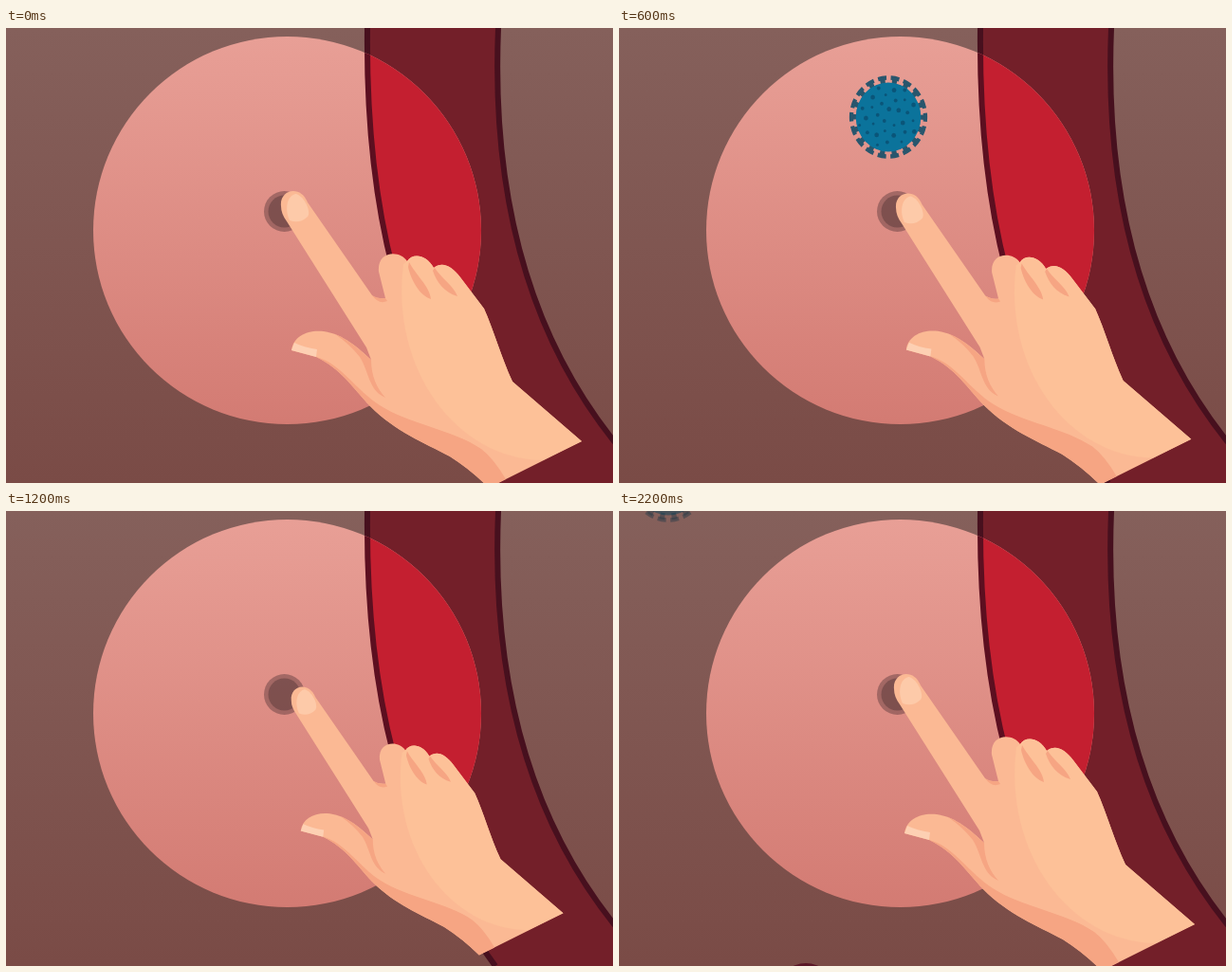
An HTML page with a canvas for the animation above (2300 ms loop, 640 px wide and 480 px high).

```html
<!DOCTYPE html>
<html lang="en">
<head>
<meta charset="utf-8">
<style>
html, body { margin: 0; width: 100%; height: 100%; overflow: hidden; background: #7f554f; }
canvas { display: block; width: 640px; height: 480px; }
</style>
</head>
<body>
<canvas id="stage" width="640" height="480"></canvas>
<script>
const ctx = document.getElementById('stage').getContext('2d');
const LOOP = 2300, STEP = 100, TAU = Math.PI * 2;

const dim = { top: '#85605b', bottom: '#7a4b46', vessel: '#731f29', edge: '#47101e',
  body: '#0b4259', spot: '#093448', spike: '#2d3c48' };
const lit = { top: '#e89f96', bottom: '#d37b73', vessel: '#c41f30', edge: '#5c0f20',
  body: '#0b739b', spot: '#0a5579', spike: '#29566d' };

const leftWall = 'M381 0C379 180 410 340 516 480';
const vessel = new Path2D(leftWall + 'L642 480V437C548 320 512 170 519 0Z');
const walls = new Path2D(leftWall + 'M519 0C512 170 548 320 642 437');

// Hand parts, painted in order
const outline = new Path2D('M290 188C288 170 311 165 318 184L386 282Q392 286 400 285L393 257C391 235 415 234 423 246C429 237 443 239 451 253C460 246 470 251 479 263L504 296C514 318 522 347 534 373L607 436L509 485Q490 466 468 452C440 437 411 426 384 399C366 380 354 360 327 347L301 340C303 325 318 318 335 320C356 323 372 338 385 350L380 337L296 204Q290 196 290 188Z');
const hand = [
  ['#fbb994', outline],
  ['#fdc198', 'M423 246C429 237 443 239 451 253C460 246 470 251 479 263L504 296C514 318 522 347 534 373L607 436L566 456C475 455 405 360 419 249Z'],
  ['#f6a583', 'M327 347C352 353 369 382 394 398C425 418 472 424 501 444Q514 454 527 476L509 485Q490 466 468 452C440 437 411 426 384 399C366 380 354 360 327 347Z'],
  ['#f6a583', 'M347 323C364 330 374 341 385 350C385 367 391 380 400 390C382 382 383 363 373 347Q362 333 347 323Z'],
  ['#f6a583', 'M425 247C431 259 447 273 448 286C436 282 427 266 424 252Z'],
  ['#f6a583', 'M452 253C459 264 472 272 476 283C462 279 454 268 450 256Z'],
  ['#f6a583', 'M386 282Q392 286 400 285L402 288Q393 292 386 282Z'],
  ['#fdcaa9', 'M299 203C293 190 297 176 306 175C315 178 322 194 318 199Q310 207 299 203Z'],
  ['#fdd0b3', 'M301 340L327 347L328 339Q314 337 304 332Z']
].map(([color, path]) => [color, new Path2D(path)]);

function disc(x, y, r, color) {
  ctx.beginPath();
  ctx.arc(x, y, r, 0, TAU);
  ctx.fillStyle = color;
  ctx.fill();
}

function dashRing(r, width, dash, color) {
  const slot = TAU * r / 18;
  ctx.setLineDash([slot * dash, slot * (1 - dash)]);
  ctx.lineDashOffset = slot * dash / 2;
  ctx.lineWidth = width;
  ctx.strokeStyle = color;
  ctx.beginPath();
  ctx.arc(0, 0, r, 0, TAU);
  ctx.stroke();
}

function virus(x, y, pal, alpha = 1) {
  ctx.save();
  ctx.globalAlpha = alpha;
  ctx.translate(x, y);
  ctx.scale(0.94, 1);
  dashRing(38, 7, 0.42, pal.spike);
  dashRing(41.5, 4.5, 0.66, pal.spike);
  disc(0, 0, 36.5, pal.body);
  for (let i = 1; i < 32; i++) {
    const r = 6.1 * Math.sqrt(i), a = i * 2.4;
    disc(r * Math.cos(a), r * Math.sin(a), 1.5 + i % 3 * 0.5, pal.spot);
  }
  ctx.restore();
}

function burst(t) {
  const p = (t - 800) / 400;
  ctx.globalAlpha = 1 - p;
  for (let i = 0; i < 14; i++) {
    const a = i * TAU / 14, r = 190 * p * (0.7 + i % 3 * 0.15);
    disc(293 + r * Math.cos(a), 186 + r * Math.sin(a), 5 * (1 - p) + 1, lit.body);
  }
  ctx.globalAlpha = 1;
}

function scene(t, pal, y0, y1) {
  const fill = ctx.createLinearGradient(0, y0, 0, y1);
  fill.addColorStop(0, pal.top);
  fill.addColorStop(1, pal.bottom);
  ctx.fillStyle = fill;
  ctx.fillRect(0, 0, 640, 480);
  ctx.fillStyle = pal.vessel;
  ctx.fill(vessel);
  ctx.lineWidth = 6;
  ctx.strokeStyle = pal.edge;
  ctx.stroke(walls);

  const s = (t - 600) / 200;
  if (t < 900) virus(284 + 5.5 * Math.sin(s * Math.PI / 2) ** 2, 94 + 66.5 * s + 5.5 * s * s, pal);
  if (t > 1800) {
    const d = (t - 2200) / 100 * 33;
    virus(52, d - 32, pal, 0.5);
    disc(197, 507 - d, 30, '#5a1727');
  }
}

function press(t) {
  const p = t < 960 ? (t - 500) / 460 : (1500 - t) / 540;
  return Math.sin(Math.PI / 2 * Math.max(0, p)) ** 2;
}

function draw(t) {
  scene(t, dim, 0, 480);
  ctx.save();
  ctx.beginPath();
  ctx.arc(296.5, 213.5, 204.5, 0, TAU);
  ctx.clip();
  scene(t, lit, 9, 418);
  if (t >= 900 && t < 1200) burst(t);
  disc(293.5, 193.5, 21.5, 'rgba(51,31,36,.35)');
  disc(293.5, 193.5, 17, 'rgba(51,31,36,.32)');
  ctx.restore();

  const k = 1 - 0.163 * press(t);
  ctx.save();
  ctx.translate(403, 313);
  ctx.scale(k, k);
  ctx.translate(-403, -313);
  for (const [color, path] of hand) {
    ctx.fillStyle = color;
    ctx.fill(path);
  }
  ctx.restore();
}

function tick() {
  const t = performance.now() % LOOP;
  draw(Math.floor(t / STEP) * STEP);
  requestAnimationFrame(tick);
}
tick();
</script>
</body>
</html>
```
